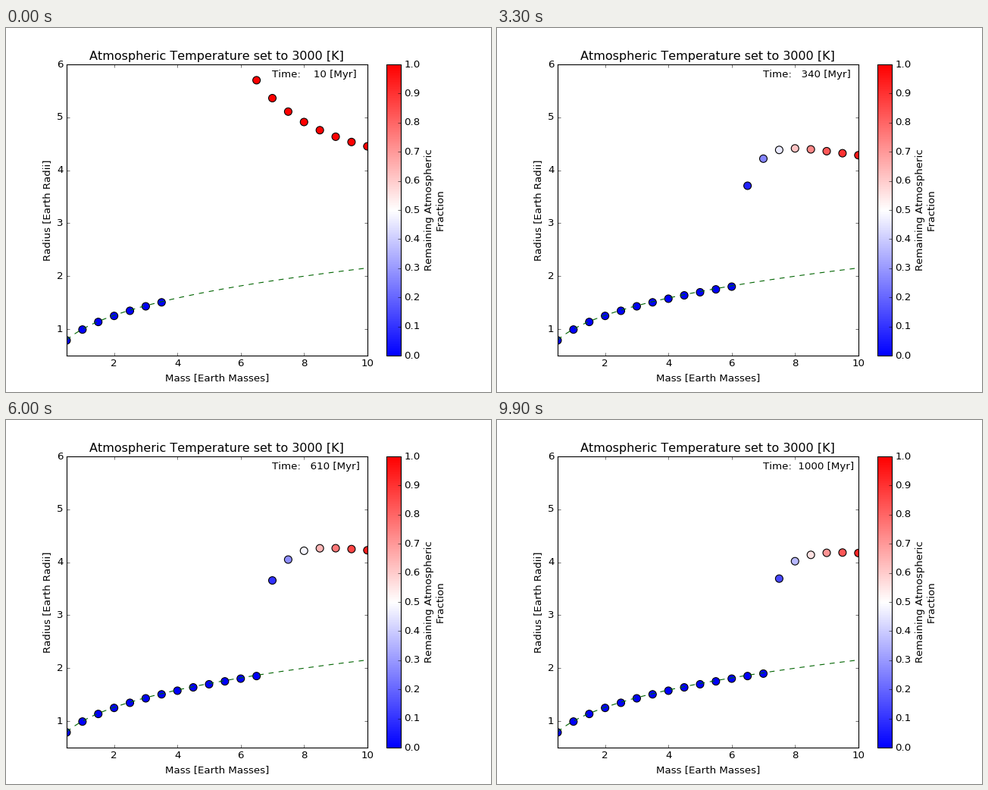
A matplotlib script for the animation above (10 s loop, 640 by 480 pixels).

```python
import numpy as np
import matplotlib.pyplot as plt
from matplotlib.animation import FuncAnimation

plt.style.use("classic")
plt.rcParams.update({"font.family": "DejaVu Sans", "savefig.dpi": 80,
                     "text.kerning_factor": 6})

FRAMES = 100
STEP_MYR = 10
LIGHTEST_WITH_GAS = 4

masses = np.arange(0.5, 10.1, 0.5)
gassy = masses >= LIGHTEST_WITH_GAS
heavy = masses[gassy]
bare = 0.992 * np.cbrt(masses)

# Light planets start with deeper envelopes and lose them faster.
depth = 0.795 + 10.6 / (heavy - 3.03)
loss_rate = 0.74 * (heavy / 7) ** -3.3 - 0.197


def planets(age):
    """Radius and remaining atmospheric fraction of every planet."""
    clock = np.log((age + 100) / 110)
    left = 1 - loss_rate * clock
    # Loss slows down once little gas remains.
    left += 0.107 * np.exp(-np.maximum(left, 0) / 0.12)
    left = np.clip(left, 0, 1)

    radius, fraction = bare.copy(), np.zeros(len(masses))
    fraction[gassy] = left
    radius[gassy] += depth * (1 - 0.045 * clock) * left ** 0.25
    return radius, fraction


fig = plt.figure(figsize=(8, 6), dpi=80, facecolor="white")
ax = fig.add_subplot()
dots = ax.scatter(masses, bare, c=np.zeros(len(masses)), s=80, cmap="bwr",
                  vmin=0, vmax=1, edgecolors="black", linewidths=1)
curve = np.linspace(0.5, 10, 200)
ax.plot(curve, np.cbrt(curve), "--", color="darkgreen", lw=1)
ax.set(xlim=(0.5, 10), ylim=(0.5, 6),
       xticks=range(2, 11, 2), yticks=range(1, 7),
       xlabel="Mass [Earth Masses]", ylabel="Radius [Earth Radii]",
       title="Atmospheric Temperature set to 3000 [K]")
label = ax.text(7, 5.75, "")

bar = fig.colorbar(dots, ax=ax, ticks=np.linspace(0, 1, 11), format="%.1f")
bar.set_label("Remaining Atmospheric\nFraction")


def update(frame):
    age = (frame + 1) * STEP_MYR
    radius, fraction = planets(age)
    dots.set_offsets(np.column_stack([masses, radius]))
    dots.set_array(fraction)
    label.set_text(f"Time: {age:5d} [Myr]")
    return dots, label


anim = FuncAnimation(fig, update, frames=FRAMES, interval=100, repeat=True)
plt.show()
```
